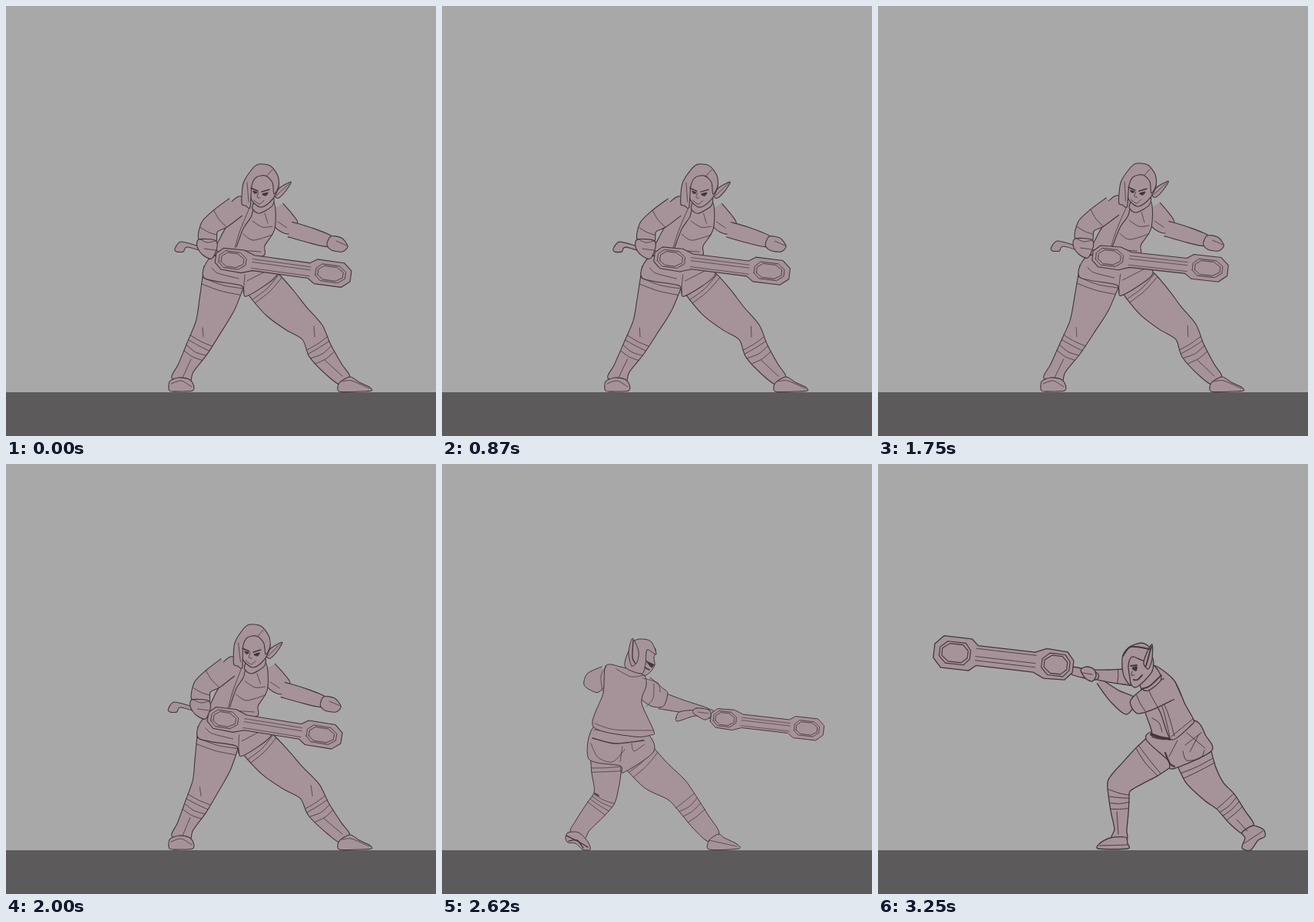
These frames come from a looping animation (560 px wide and 560 px high, 3620 ms). An HTML page with a canvas:

```html
<!DOCTYPE html>
<html lang="en">
<head>
<meta charset="utf-8">
<title>Swing</title>
<style>
  html, body { margin: 0; height: 100%; overflow: hidden; background: #a9a8a8; }
  canvas { display: block; width: 100vmin; height: 100vmin; }
</style>
</head>
<body>
<canvas id="stage" width="560" height="560"></canvas>
<script>
const ctx = document.getElementById('stage').getContext('2d');
const SKIN = '#a69299', INK = '#40373c', LOOP = 3620;
const clamp = v => Math.max(0, Math.min(1, v));
const mix = (a, b, t) => a.map((v, i) => v + (b[i] - v) * t);
let shift = [0, 0], weight = 1;

// Feet stay planted while hips and shoulders take more and more of the shift.
function lean([x, y]) {
  const low = clamp((480 - y) / 120), high = clamp((360 - y) / 150);
  return [x + shift[0] * (0.6 * low + 0.4 * high), y + shift[1] * low];
}

function rows(text, size) {
  const v = text.split(' ').map(Number), out = [];
  while (v.length) out.push(v.splice(0, size));
  return out;
}

function trace(pts, closed, k = 0.14) {
  const n = pts.length;
  const at = i => closed ? pts[(i + n) % n] : pts[Math.max(0, Math.min(n - 1, i))];
  ctx.beginPath();
  ctx.moveTo(...pts[0]);
  for (let i = 0; i < (closed ? n : n - 1); i++) {
    const [a, b, c, d] = [at(i - 1), at(i), at(i + 1), at(i + 2)];
    ctx.bezierCurveTo(b[0] + (c[0] - a[0]) * k, b[1] + (c[1] - a[1]) * k,
      c[0] - (d[0] - b[0]) * k, c[1] - (d[1] - b[1]) * k, ...c);
  }
  if (closed) ctx.closePath();
}

function ink(width = 1) {
  ctx.strokeStyle = INK;
  ctx.lineWidth = width * weight;
  ctx.stroke();
}

function shape(text, fill = SKIN) {
  trace(rows(text, 2).map(lean), true);
  ctx.fillStyle = fill;
  ctx.fill();
  ink();
}

function line(text, width = 0.72) {
  trace(rows(text, 2).map(lean), false);
  ink(width);
}

// A limb is a spine of x, y, half-width; rings are drawn across it at the given positions.
function limb(text, rings = []) {
  const spine = rows(text, 3), sides = [[], []];
  spine.forEach(([x, y, r], i) => {
    const a = spine[Math.max(0, i - 1)], b = spine[Math.min(spine.length - 1, i + 1)];
    const d = Math.hypot(b[0] - a[0], b[1] - a[1]);
    const nx = (b[1] - a[1]) / d * r, ny = (a[0] - b[0]) / d * r;
    sides[0].push(lean([x + nx, y + ny]));
    sides[1].push(lean([x - nx, y - ny]));
  });
  trace([...sides[0], ...sides[1].slice().reverse()], false);
  ctx.fillStyle = SKIN;
  ctx.fill();
  ink();
  for (const p of rings) {
    const i = Math.min(spine.length - 2, Math.floor(p));
    const [a, b] = sides.map(s => mix(s[i], s[i + 1], p - i));
    const mid = mix(a, b, 0.5), ahead = mix(mid, lean(spine[i + 1]), 0.1);
    trace([a, ahead, b], false);
    ink(0.75);
  }
}

function leg(spine, hem, sockTop, sockEnd, boot) {
  const socks = [0, 0.3, 0.62, 1].map(t => sockTop + (sockEnd - sockTop) * t);
  limb(spine, [hem, hem + 0.2, ...socks]);
  shape(boot);
}

// Both halves of the weapon mirror each other around its axis.
function weapon(a, b, scale = 1) {
  const d = Math.hypot(b[0] - a[0], b[1] - a[1]);
  const at = ([u, v]) => {
    const p = mix(a, b, u), s = v * scale / d;
    return [p[0] - (b[1] - a[1]) * s, p[1] + (b[0] - a[0]) * s];
  };
  const mirror = half => [...half, ...half.map(([u, v]) => [u, -v]).reverse()].map(at);
  const panel = pts => { trace(pts, true, 0); ctx.fillStyle = SKIN; ctx.fill(); ink(); };
  panel(mirror([[0, 6], [0.05, 14], [0.2, 15], [0.28, 10], [0.69, 10], [0.74, 16], [0.94, 16], [1, 7]]));
  for (const [u0, u1] of [[0.025, 0.225], [0.74, 0.96]])
    for (const inset of [0, 0.018]) {
      const l = u0 + inset, r = u1 - inset, h = 11 - inset * 110;
      trace(mirror([[l, h * 0.4], [l + 0.04, h], [r - 0.05, h], [r, h * 0.4]]), true, 0);
      ink(0.85);
    }
  for (const v of [-5, -1, 7]) {
    trace([[0.27, v], [0.7, v]].map(at), false);
    ink(0.65);
  }
}

function ready(a, b) {
  weight = 1.1;
  leg('286 346 29 275 388 24 264 417 18 249 446 15 234 472 11 227 489 12', 0.35, 2.65, 3.35,
    '213 489 225 484 238 486 244 493 243 501 225 502 213 501');
  leg('322 350 20 338 366 24 357 387 24 378 407 20 399 425 16 409 449 16 428 474 12 442 488 8', 1, 4.6, 5.35,
    '434 491 448 483 460 490 473 496 476 501 460 502 434 502');
  line('241 460 230 484'); line('256 419 257 431'); line('401 417 402 431'); line('415 461 438 482');
  line('215 492 228 488 242 496'); line('438 489 450 488 473 498');
  shape('270 326 258 354 306 364 313 378 353 350 333 328');
  line('268 341 276 348 303 355'); line('311 350 309 374'); line('314 358 341 344');
  limb('352 262 10 362 280 14 374 290 9');
  limb('370 291 10 394 298 10 423 307 7');
  shape('423 300 437 302 445 313 438 320 424 318 418 311');
  line('430 306 444 312'); line('354 281 366 289');
  shape('318 250 303 248 290 260 293 276 280 300 275 322 333 326 337 312 350 290 348 254');
  line('322 263 319 275 309 290 300 314', 1); line('317 263 305 292 298 315');
  line('321 280 334 288 347 287'); line('337 270 341 283'); line('309 297 322 305 347 298');
  line('302 318 332 320');
  limb('299 262 14 279 277 14 265 288 12 262 306 11', [1, 2.3]);
  shape('325 254 321 264 330 270 347 260 347 248');
  shape('350 247 356 237 371 229 365 240 355 250'); line('352 247 369 231');
  shape('320 226 318 240 320 253 331 262 343 256 352 244 355 230 346 212');
  shape('329 206 344 208 354 221 355 235 349 245 347 230 338 221 326 223 320 234 318 262 312 260 307 257 309 231 320 213');
  line('347 213 339 222'); line('314 230 316 255');
  line('319 237 328 241', 1.4); line('333 242 343 239', 1.4);
  shape('322 241 327 243 324 244', INK); shape('334 245 341 243 338 247', INK);
  line('329 243 327 249 331 250'); line('323 253 330 258 336 253');
  shape('220 316 228 307 252 313 274 318 274 325 237 314 231 320 222 320');
  weapon(a, b);
  shape('251 304 249 314 256 324 268 329 275 314 272 305');
  line('252 303 262 308 273 306'); line('258 316 273 318');
}

function swept() {
  weight = 1.3;
  leg('203 362 25 197 386 24 192 412 20 192 431 17 212 447 10 232 463 9 243 472 8', 0.5, 3.3, 3.95,
    '236 464 240 488 246 491 250 480 258 465 257 457 246 460');
  leg('242 366 20 260 401 19 273 423 16 288 436 13 303 456 12 316 479 11', 0.4, 3.1, 3.75,
    '306 488 326 474 335 479 336 489 326 493 316 502 306 503 303 498');
  shape('187 330 176 374 223 374 229 385 266 372 262 354 226 326');
  line('204 345 208 356 221 360 227 348'); line('232 344 232 362 226 378');
  line('186 340 210 330 240 335 260 350', 1.4); line('185 349 206 338 238 343 262 362', 1.4);
  line('308 491 332 478'); line('243 462 249 470 246 488');
  shape('120 270 126 265 133 267 139 279 130 284 122 278');
  limb('156 286 12 141 286 11 129 279 6');
  limb('190 262 13 166 280 14 152 286 12');
  limb('262 293 10 285 298 7 312 305 5');
  limb('240 265 10 252 284 13 265 294 11');
  shape('187 252 225 252 239 256 249 288 269 317 270 326 220 326 190 332 183 322 180 286');
  line('184 317 189 326 215 321 270 321'); line('217 268 222 292 221 311'); line('188 262 183 296');
  shape('186 247 188 255 202 257 218 252 214 242');
  shape('182 222 182 240 187 250 197 253 208 248 217 234 213 209 199 206');
  shape('202 207 187 210 176 220 167 247 172 251 177 246 180 251 187 228 197 218');
  line('172 221 184 210 201 206 213 208 217 220', 1.4); line('205 209 198 222 200 236', 1.4);
  shape('198 235 201 223 216 212 212 230 205 243'); line('203 237 215 213'); line('207 224 215 244');
  shape('185 233 190 234 189 238', INK); line('189 245 194 248', 1.4);
  shape('276 320 279 311 322 303 323 313 300 313');
  weapon([322, 312], [471, 306]);
  shape('303 299 314 300 319 307 314 313 303 312 299 306'); line('305 304 316 307');
}

function coiled() {
  weight = 1;
  leg('212 374 19 214 402 19 214 421 16 211 436 15 200 450 14 183 471 11 176 484 10', 0.75, 3, 3.9,
    '164 480 178 480 190 492 193 502 183 502 174 494 164 493 161 487');
  leg('250 375 23 278 405 22 305 424 17 318 440 15 337 466 13 354 486 9', 0.35, 2.9, 3.7,
    '348 490 360 482 368 487 384 495 386 501 348 502');
  line('162 484 178 492 190 499', 1.4); line('165 491 176 490 184 500', 1.4); line('199 429 204 432', 1.6);
  line('348 490 384 498');
  shape('200 340 191 384 232 393 236 402 276 374 262 348');
  line('196 357 225 364 263 360', 1.4); line('194 364 203 382 222 388 238 372'); line('198 346 262 355');
  line('235 368 232 388'); line('247 364 250 374 264 365');
  limb('214 272 10 199 283 14 193 293 9');
  limb('285 308 11 315 316 8 347 324 5');
  limb('262 290 15 279 303 14 291 307 9');
  shape('213 263 232 264 262 274 266 288 260 311 276 348 272 353 250 355 197 342 210 298');
  line('199 338 225 346 275 347'); line('227 267 246 277 263 275'); line('214 264 207 276 209 296');
  line('262 279 281 285 284 297'); line('276 286 275 305 266 316');
  shape('262 229 278 241 276 252 277 262 271 271 263 275 250 262');
  shape('250 231 262 228 273 232 279 248 267 242 265 261 260 273 240 266 239 254');
  shape('247 263 243 246 248 227 256 244 254 258'); line('249 229 248 252 252 260', 1.4);
  line('266 257 276 262', 1.4); shape('268 259 275 261 273 265', INK); line('264 265 270 268', 1.4);
  shape('305 330 312 322 351 320 351 331 330 328 307 335');
  weapon([350, 330], [497, 347], 0.88);
  shape('331 318 347 320 350 328 342 333 327 324'); line('333 323 347 325');
}

function lunge(a, b) {
  weight = 1.3;
  leg('369 373 25 350 388 23 332 402 19 314 419 16 314 438 13 315 456 11 316 476 8 314 489 10', 0.8, 3.45, 4.6,
    '302 487 322 486 325 494 325 501 287 501 289 494');
  leg('408 372 25 420 404 22 437 426 17 453 440 15 468 460 13 483 476 9', 0.65, 2.95, 3.75,
    '474 480 488 471 502 476 504 485 495 490 485 503 474 500 478 487');
  line('311 453 313 482'); line('289 497 325 496'); line('467 463 481 478'); line('477 494 501 478');
  shape('357 348 350 360 378 386 384 397 434 374 427 354 411 334');
  line('374 376 380 390 386 394', 1.6); line('397 374 402 386 420 383 425 373');
  line('402 350 426 370'); line('400 366 421 350'); line('406 375 418 352'); line('390 360 379 381');
  limb('288 283 4 308 302 9 330 316 12');
  shape('347 288 344 310 356 346 358 356 380 356 377 320');
  line('356 352 367 356 380 358', 2.8); line('357 331 366 337 370 349');
  shape('357 262 385 281 400 313 411 333 408 340 382 359 367 322 347 288');
  line('362 297 372 322 380 355'); line('367 300 378 326 386 354'); line('382 355 410 332'); line('387 284 395 302');
  limb('379 293 15 352 306 15 333 317 9', [0.8, 1.5]);
  limb('281 274 6 300 276 8 320 277 10 340 277 11', [1.6]);
  shape('343 276 342 291 352 295 369 280 358 262'); line('343 293 354 289 369 275', 1.4);
  shape('330 243 323 258 329 286 338 290 357 270 356 250');
  shape('318 264 319 249 328 238 343 233 353 238 357 250 346 256 331 251 326 263 329 288 321 278');
  shape('346 260 350 246 357 235 357 254 352 267'); line('349 263 356 238', 1.4);
  line('319 250 329 238 354 241', 1.5); line('329 263 337 262', 1.4); shape('331 266 337 264 336 269', INK);
  line('331 270 330 275 334 275'); line('333 281 338 281 344 275', 1.4);
  shape('252 264 285 272 283 281 252 274');
  weapon(a, b, 1.3);
  shape('264 268 272 264 281 267 284 276 279 283 270 279'); line('266 272 279 274');
}

function drawArc() {
  const tone = ctx.createLinearGradient(30, 0, 460, 0);
  tone.addColorStop(0, '#b9b8b8');
  tone.addColorStop(0.6, '#c4c4c4');
  tone.addColorStop(1, '#c8c8c8');
  const outer = '34 264 31 237 40 200 60 165 95 138 140 124 190 119 250 126 310 143 360 168 405 200 440 240 466 296';
  const inner = '359 296 345 255 318 215 285 185 245 163 205 149 160 143 115 148 75 172 48 210 38 240';
  ctx.save();
  ctx.fillStyle = tone;
  ctx.filter = 'blur(2px)';
  trace([...rows(outer, 2), ...rows(inner, 2)], true);
  ctx.fill();
  ctx.restore();
}

// Loose parallel strokes scattered along a path.
function hatch(path, count, dx, dy) {
  let seed = 7;
  const rnd = () => (seed = seed * 16807 % 2147483647) / 2147483647;
  const pts = rows(path, 2);
  ctx.beginPath();
  for (let i = 0; i < count; i++) {
    const u = (i + rnd()) / count * (pts.length - 1), j = Math.min(pts.length - 2, Math.floor(u));
    const [x, y] = mix(pts[j], pts[j + 1], u - j);
    const a = 0.35 + rnd() * 0.65, b = 0.35 + rnd() * 0.65, skew = (rnd() - 0.5) * 4;
    ctx.moveTo(x - dx * a, y - dy * a);
    ctx.lineTo(x + dx * b + skew, y + dy * b + skew / 3);
  }
  ctx.lineWidth = 0.6;
  ctx.stroke();
}

function swing() {
  drawArc();
  swept();
  hatch('322 298 470 294', 85, 0, 7);
  hatch('324 325 470 319', 85, 0, 6);
  hatch('173 378 171 405 174 430 183 441', 45, 5, 1);
  hatch('183 441 205 448 225 463 240 480', 32, 2, 5);
  hatch('212 407 207 428 222 440 239 456 257 458', 34, 4, 3);
  hatch('257 458 251 475 244 490', 18, 5, 1);
}

function idle(step) {
  const c = Math.cos(step * Math.PI / 4), s = Math.sin(step * Math.PI / 4);
  const dx = 2.5 - 2.5 * c - 4 * s, tip = -5 + 5 * c + 2.5 * s;
  shift = [2.5 - 2.5 * c - 5 * s, -2 + 2 * c - s];
  ready([273 + dx, 328 + tip * 0.41], [449 + dx, 352 + tip]);
}

const posed = (draw, dx = 0, dy = 0, ...args) => () => { shift = [dx, dy]; draw(...args); };
const lunged = dx => posed(lunge, dx, -dx / 5, [254 + dx, 264], [73 + dx, 243 + dx / 2]);
const attack = [
  posed(ready, -12, 3, [263, 329], [437, 357]),
  posed(ready, -26, 2, [232, 318], [56, 278]),
  posed(swing),
  posed(swept, 14, 8),
  posed(coiled, -6, -4),
  posed(coiled),
  posed(coiled, 9, 2),
  lunged(-14), lunged(-9), lunged(-4), lunged(0)
];

const start = performance.now();
function play(now) {
  const t = Math.max(0, now - start) % LOOP;
  const step = Math.min(26, Math.floor((Math.floor(t / 10) + 0.5) / 12.5));
  ctx.lineJoin = ctx.lineCap = 'round';
  ctx.fillStyle = '#a9a8a8';
  ctx.fillRect(0, 0, 560, 560);
  ctx.fillStyle = '#5c5a5b';
  ctx.fillRect(0, 503, 560, 57);
  if (step < 16) idle(step); else attack[step - 16]();
  requestAnimationFrame(play);
}
play(start);
</script>
</body>
</html>
```
